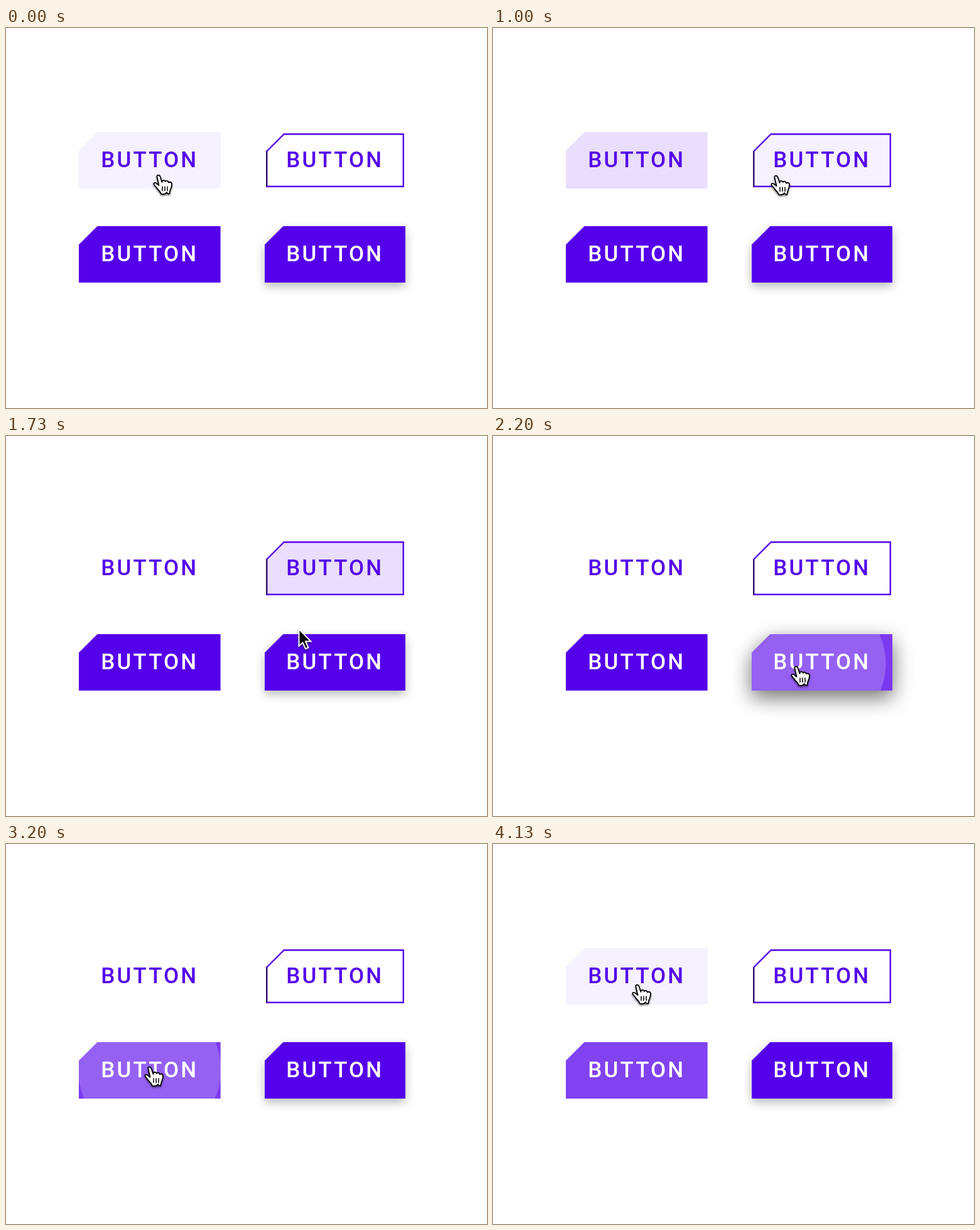
An HTML page for the animation above (4.19 s loop, 766 px wide and 606 px high).

```html
<!DOCTYPE html>
<html lang="en">
<head>
<meta charset="utf-8">
<title>Cut-corner buttons</title>
<style>
  html, body { margin: 0; width: 100%; height: 100%; overflow: hidden; background: #fff; }
  svg { display: block; width: 100%; height: 100%; }
  text { font: 500 35px Roboto, sans-serif; letter-spacing: 3.125px; }
  #cursor { filter: drop-shadow(0 2px 1.5px rgba(0, 0, 0, .5)); }
</style>
</head>
<body>
<svg id="stage" viewBox="0 0 766 606">
  <g id="buttons"></g>
  <g id="cursor">
    <path id="arrow" d="M1.5 3V30L7.5 24.5L12 34.5L16.5 32.5L12 22.5H20.5Z"
      fill="#000" stroke="#fff" stroke-width="2"/>
    <g id="hand" stroke="#000" stroke-width="1.8" stroke-linejoin="round" stroke-linecap="round">
      <path fill="#fff" d="M-1.5 1.5C-2.5-2 2.5-2.500 3.500 1L6.500 10C6 6 11 6 12 9C12.500 7 16 7 17 10.500C18 9 21.500 9.500 22 12C22.500 17 20.500 20 19 24L18.500 28C17 29 15 28.500 14 26C12 29.500 9 29 5 28.500C4 26 1 22.500-1 20.500C-3 17-5 15.500-6.500 13.500C-7.500 10.500-4 10-1.500 12.500L1.500 15Z"/>
      <path fill="none" stroke-width="1.5" d="M7 17V23.5M11 17V23.5M15 17V23.5"/>
    </g>
  </g>
</svg>
<script>
const LOOP = 4190, FPS = 15, PURPLE = '#5500eb';
const $ = id => document.getElementById(id);

const buttons = [
  { x: 116, y: 166, w: 225.6, h: 90, textX: 151.3, light: true },
  { x: 415.2, y: 169.2, w: 217.6, h: 83.6, textX: 446.3, light: true, outline: true },
  { x: 412, y: 316, w: 224, h: 90, textX: 446.3, raised: true },
  { x: 116, y: 316, w: 225.6, h: 90, textX: 151.3 }
];

// One press per button, in the order of the list above
const presses = [
  { t: 130, x: 242, y: 236 },
  { t: 1060, x: 450, y: 237 },
  { t: 2096, x: 482, y: 368 },
  { t: 3096, x: 228, y: 356 }
];

// Pointer stops: time, x, y
const path = [
  [0, 242, 236], [400, 242, 236], [930, 450, 237], [1330, 450, 237],
  [1670, 465, 305], [1800, 465, 305], [2030, 482, 369], [2670, 482, 369],
  [3030, 228, 357], [3700, 228, 357], [4130, 229, 226], [LOOP, 229, 226]
];

const clamp = v => Math.min(1, Math.max(0, v));
const lerp = (a, b, p) => a + (b - a) * p;
const smooth = p => p * p * (3 - 2 * p);

// cubic-bezier(.4, 0, .2, 1)
function ease(x) {
  x = clamp(x);
  let lo = 0, hi = 1;
  for (let i = 0; i < 20; i++) {
    const s = (lo + hi) / 2, r = 1 - s;
    if (1.2 * s * r * r + .6 * s * s * r + s ** 3 < x) lo = s; else hi = s;
  }
  return smooth(lo);
}

function set(el, attrs) {
  for (const k in attrs) el.setAttribute(k, attrs[k]);
  return el;
}

function add(parent, tag, attrs) {
  return parent.appendChild(set(document.createElementNS('http://www.w3.org/2000/svg', tag), attrs));
}

buttons.forEach((b, i) => {
  const { x, y, w, h } = b, cut = b.outline ? 27.5 : 29.5;
  const points = `${x + cut},${y} ${x + w},${y} ${x + w},${y + h} ${x},${y + h} ${x},${y + cut}`;
  const group = add($('buttons'), 'g', {});
  const shape = attrs => add(group, 'polygon', { points, ...attrs });
  const tint = b.light ? PURPLE : '#fff';

  add(add(group, 'clipPath', { id: 'clip' + i }), 'polygon', { points });
  if (b.raised) b.shadow = shape({ fill: '#000' });
  if (!b.light) shape({ fill: PURPLE });
  b.overlay = shape({ fill: tint });
  b.ripple = add(group, 'circle', { fill: tint, 'clip-path': `url(#clip${i})` });
  if (b.outline) {
    shape({ fill: 'none', stroke: PURPLE, 'stroke-width': 2.4 });
    add(group, 'path', { d: `M${x} ${y + cut}V${y + h}`, stroke: '#2a1a50', 'stroke-width': 2 });
  }
  add(group, 'text', { x: b.textX, y: i < 2 ? 222 : 372, fill: tint }).textContent = 'BUTTON';
});

function pointerAt(t) {
  const i = path.findIndex(p => p[0] > t);
  const [t0, x0, y0] = path[i - 1], [t1, x1, y1] = path[i];
  const p = smooth((t - t0) / (t1 - t0));
  return [lerp(x0, x1, p), lerp(y0, y1, p)];
}

function draw(t) {
  const [px, py] = pointerAt(t);
  const focused = presses.filter(p => p.t <= t).length - 1;
  let overButton = false;

  buttons.forEach((b, i) => {
    const press = presses[i], age = t - press.t;
    const hover = px >= b.x && px <= b.x + b.w && py >= b.y && py <= b.y + b.h;
    const [hoverLevel, focusLevel, rippleLevel] = b.light ? [.055, .13, .12] : [.08, .26, .2];
    overButton ||= hover;

    let level = hover ? hoverLevel : 0;
    if (i === focused) level = lerp(hoverLevel, focusLevel, clamp(age / 130));
    set(b.overlay, { 'fill-opacity': level });

    // The ripple grows while drifting from the pointer to the button's centre
    const grow = ease(age / 225), size = Math.max(b.w, b.h) * .3;
    const fade = age < 0 ? 0 : clamp(age / 75) * (1 - clamp((age - 225) / 150));
    set(b.ripple, {
      cx: lerp(press.x, b.x + b.w / 2, grow),
      cy: lerp(press.y, b.y + b.h / 2, grow),
      r: lerp(size, Math.hypot(b.w, b.h) / 2 + 10, grow),
      'fill-opacity': rippleLevel * fade
    });

    if (b.shadow) {
      const lift = ease((age + 40) / 280) * (1 - ease((age - 240) / 280));
      set(b.shadow, { transform: `translate(0 ${lerp(6, 12, lift)})`, opacity: lerp(.27, .65, lift) });
      b.shadow.style.filter = `blur(${lerp(8, 19, lift)}px)`;
    }
  });

  set($('cursor'), { transform: `translate(${px} ${py})` });
  set($('hand'), { visibility: overButton ? 'visible' : 'hidden' });
  set($('arrow'), { visibility: overButton ? 'hidden' : 'visible' });
}

const start = performance.now();
function tick() {
  const t = (performance.now() - start) % LOOP;
  const step = Math.min(62, Math.floor((t + 4) * FPS / 1000));
  draw(step * 1000 / FPS);
  requestAnimationFrame(tick);
}
tick();
</script>
</body>
</html>
```
